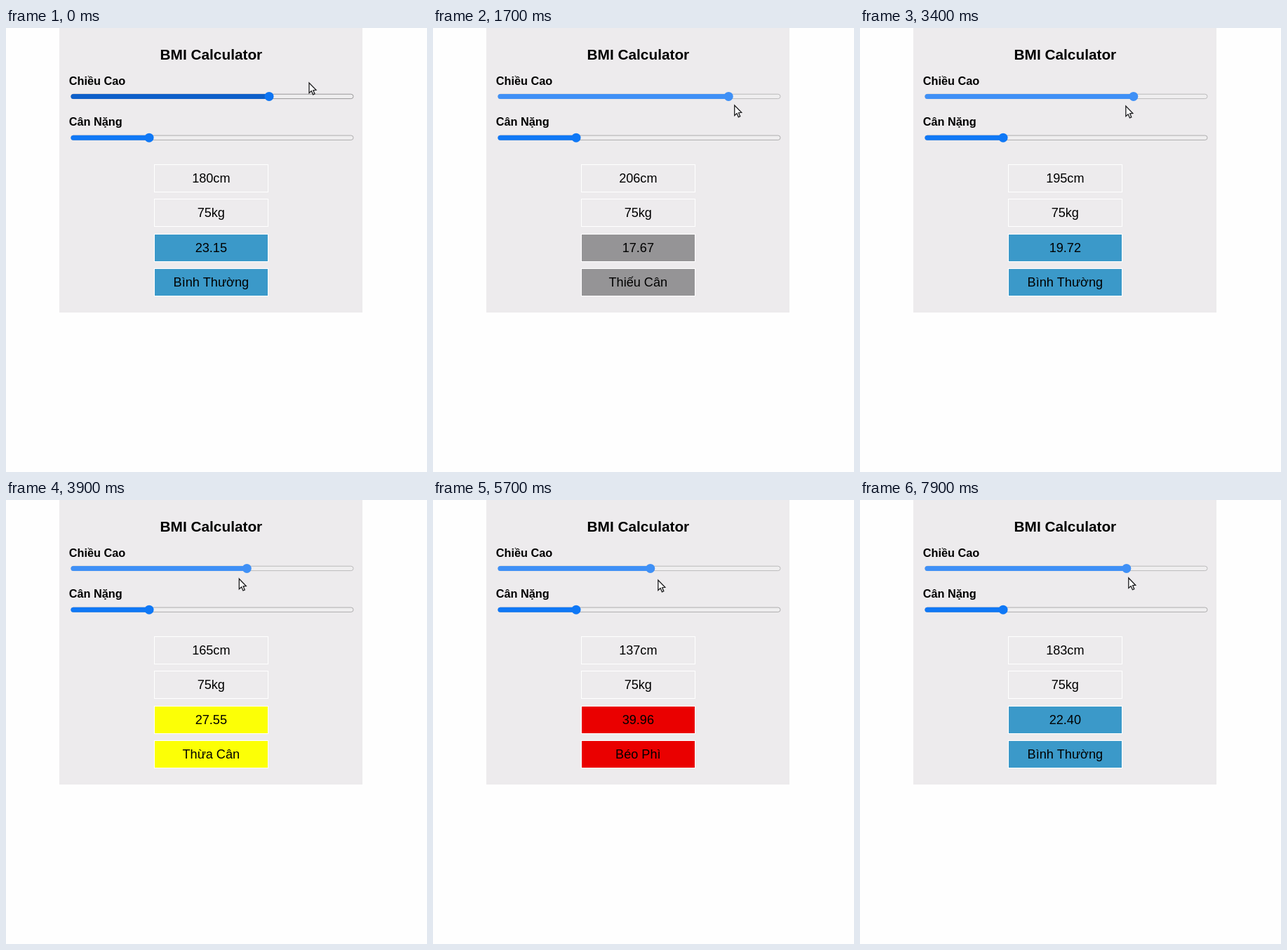
An HTML page with a canvas for the animation above (8 s loop, 600x632 px).

```html
<!DOCTYPE html>
<html lang="vi">
<head>
<meta charset="utf-8">
<style>
html, body { margin: 0; width: 100%; height: 100%; overflow: hidden; background: #fefefe; }
canvas { display: block; width: 600px; height: 632px; }
</style>
</head>
<body>
<canvas id="stage" width="600" height="632"></canvas>
<script>
const ctx = document.getElementById('stage').getContext('2d');
const LOOP = 8000, STEP = 100;
const GRAB = 700;       // the pointer takes hold of the thumb
const LEAD = 150;       // how far the pointer runs ahead of the thumb
const WEIGHT = 75;

// turning points of the dragged thumb: [time, x]
const drag = [[900, 375], [1800, 427], [2700, 422.4], [3050, 422.4], [4300, 306],
  [5750, 309.9], [6400, 361.5], [6500, 362.4], [6600, 371], [7100, 384], [7800, 379.8]];

function thumbX(t) {
  const i = drag.findIndex(p => p[0] >= t);
  if (i === 0) return drag[0][1];
  if (i < 0) return drag[drag.length - 1][1];
  const [t0, x0] = drag[i - 1], [t1, x1] = drag[i];
  return x0 + (x1 - x0) * (t - t0) / (t1 - t0);
}

const clamp = v => Math.min(1, Math.max(0, v));
const ease = v => clamp(v) ** 2 * (3 - 2 * clamp(v));

function text(str, x, y, font, align = 'center') {
  ctx.font = font + ' "Liberation Sans", Arial, sans-serif';
  ctx.textAlign = align;
  ctx.fillStyle = '#000';
  ctx.fillText(str, x, y);
}

function pill(x, y, w, h, fill, stroke) {
  ctx.beginPath();
  ctx.roundRect(x, y, w, h, h / 2);
  ctx.fillStyle = fill;
  ctx.fill();
  if (!stroke) return;
  ctx.strokeStyle = stroke;
  ctx.lineWidth = 1;
  ctx.stroke();
}

function slider(x, y, fill, thumb, border) {
  pill(92.8, y - 3.2, 402.2, 6.4, '#efeeef', border);
  pill(92.4, y - 3.5, x - 92.4, 7, fill);
  pill(x - 6.5, y - 6.5, 13, 13, thumb);
}

function box(row, label, fill = 'transparent') {
  const y = Math.round(195 + row * 49.3) - .5;
  ctx.fillStyle = fill;
  ctx.fillRect(211.5, y, 162, 39);
  ctx.strokeStyle = '#fff';
  ctx.lineWidth = 1;
  ctx.strokeRect(211.5, y, 162, 39);
  text(label, 292.3, y + 25.5, '18.1px');
}

function category(bmi) {
  if (bmi < 18.5) return ['Thiếu Cân', '#959496'];
  if (bmi < 25) return ['Bình Thường', '#3b99c9'];
  if (bmi < 30) return ['Thừa Cân', '#fcff06'];
  return ['Béo Phì', '#ea0000'];
}

const arrow = new Path2D('M0 0V14.5L3.3 11.6L5.6 16.8L8 15.7L5.8 10.7L10 10.3Z');

function pointer(x, y) {
  ctx.save();
  ctx.translate(x, y);
  ctx.fillStyle = '#fff';
  ctx.fill(arrow);
  ctx.strokeStyle = '#1c1c1e';
  ctx.lineWidth = 1.3;
  ctx.stroke(arrow);
  ctx.restore();
}

function draw(t) {
  // the readout trails the thumb by one step
  const height = Math.floor((thumbX(t - STEP) - 99) / 1.533);
  const bmi = WEIGHT / (height / 100) ** 2;
  const [label, fill] = category(bmi);
  const dragging = t >= GRAB;

  ctx.fillStyle = '#fefefe';
  ctx.fillRect(0, 0, 600, 632);
  ctx.fillStyle = '#edebed';
  ctx.fillRect(76, 0, 432, 405);

  text('BMI Calculator', 292.4, 45, 'bold 20.8px');
  text('Chiều Cao', 89.7, 81, 'bold 16.3px', 'left');
  text('Cân Nặng', 89.7, 139, 'bold 16.3px', 'left');

  const colors = dragging ? ['#3f90f6', '#3f90f6', '#bcbbbc'] : ['#0d5fc9', '#0d74f2', '#9a999a'];
  slider(thumbX(t), 97.4, ...colors);
  slider(204, 156.2, '#0f78f6', '#0f78f6', '#aeadae');

  box(0, height + 'cm');
  box(1, WEIGHT + 'kg');
  box(2, bmi.toFixed(2), fill);
  box(3, label, fill);

  const x = dragging ? thumbX(t + LEAD) + 3 : 432 - 54 * ease(t / GRAB);
  const sag = Math.sin(Math.PI * clamp((t - 2900) / 5400));
  pointer(x, 78 + 32 * ease(t / 1500) + 4 * sag);
}

const start = performance.now();
function tick() {
  const t = (performance.now() - start) % LOOP;
  draw(Math.floor(t / STEP) * STEP);
  requestAnimationFrame(tick);
}
tick();
</script>
</body>
</html>
```
